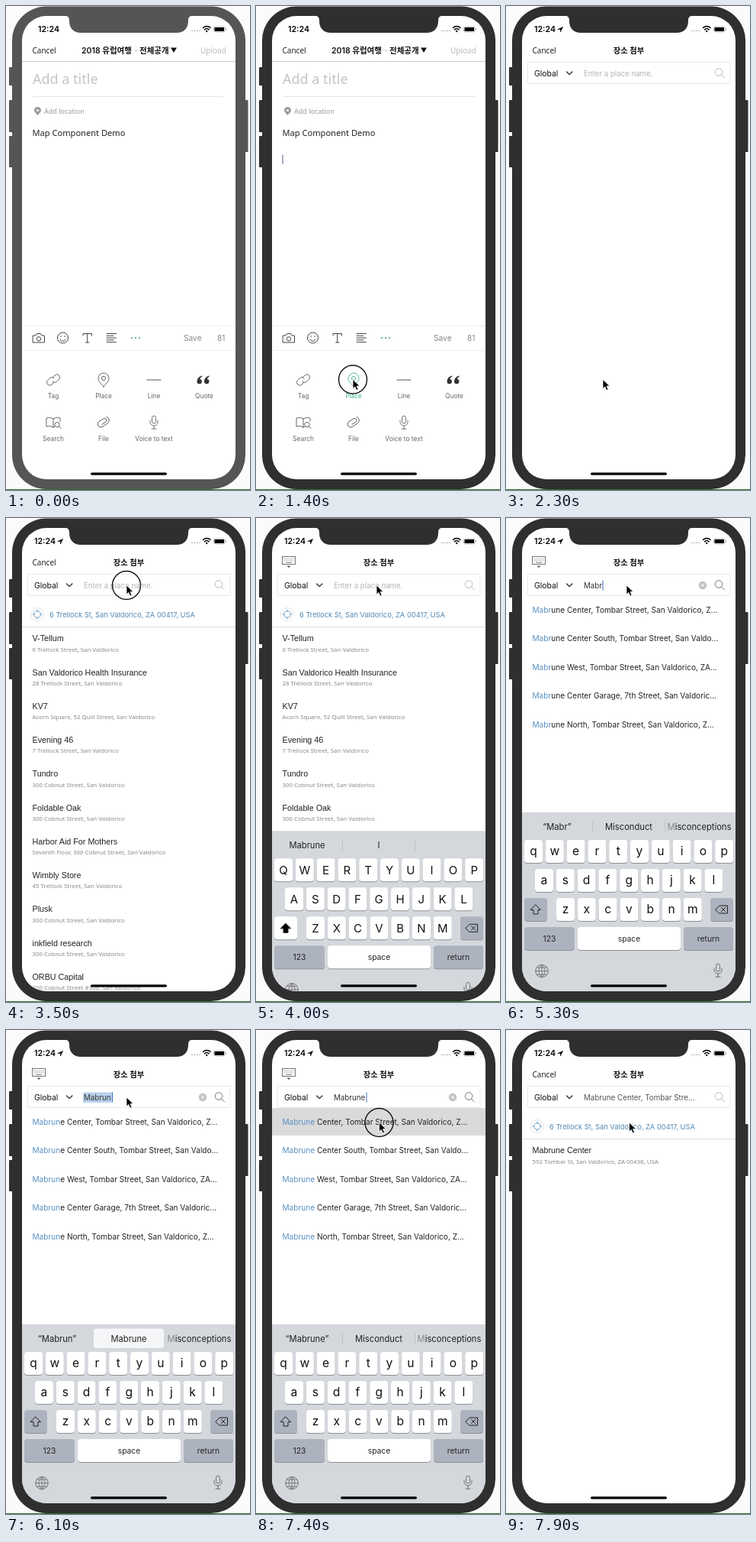
An HTML page that plays this animation: 320 px wide and 633 px high, repeating every 8000 ms.

```html
<!DOCTYPE html>
<html lang="ko">
<head>
<meta charset="utf-8">
<style>
html, body { margin: 0; width: 100%; height: 100%; overflow: hidden; background: #fbfbfb; }
svg { display: block; width: 100%; height: 100%; }
text { font-family: Inter, sans-serif; white-space: pre; }
.thin { font-family: "Noto Sans", sans-serif; font-weight: 300; }
.list { font-family: "Liberation Sans", sans-serif; }
.bold { font-family: Inter, "Noto Sans CJK KR", "Noto Sans CJK", sans-serif; font-weight: 600; }
.mid { text-anchor: middle; }
</style>
</head>
<body>
<svg id="stage" viewBox="0 0 320 633"></svg>
<script>
const LOOP = 8000, STEP = 100;
const WORD = 'Mabrune';
const CITY = 'San Valdorico';
const KEY_TIMES = [4700, 4900, 5100, 5300, 5500, 5700, 6300];
const PLACES = [
  ['V-Tellum', '6 Trellock Street'],
  [CITY + ' Health Insurance', '28 Trellock Street'],
  ['KV7', 'Acorn Square, 52 Quill Street'],
  ['Evening 46', '7 Trellock Street'],
  ['Tundro', '300 Cobnut Street'],
  ['Foldable Oak', '300 Cobnut Street'],
  ['Harbor Aid For Mothers', 'Seventh Floor, 300 Cobnut Street'],
  ['Wimbly Store', '45 Trellock Street'],
  ['Plusk', '300 Cobnut Street'],
  ['inkfield research', '300 Cobnut Street'],
  ['ORBU Capital', '300 Cobnut Street #300']
];
const RESULTS = [
  ` Center, Tombar Street, ${CITY}, Z...`,
  ' Center South, Tombar Street, San Valdo...',
  ` West, Tombar Street, ${CITY}, ZA...`,
  ' Center Garage, 7th Street, San Valdoric...',
  ` North, Tombar Street, ${CITY}, Z...`
];
const stage = document.getElementById('stage');

const ease = (t, a, b) => {
  const x = Math.min(1, Math.max(0, (t - a) / (b - a)));
  return x * x * (3 - 2 * x);
};
const text = (x, y, s, size, fill = '#222', cls = '') =>
  `<text x="${x}" y="${y}" font-size="${size}" fill="${fill}" class="${cls}">${s}</text>`;
const rect = (x, y, w, h, fill, r = 0) =>
  `<rect x="${x}" y="${y}" width="${w}" height="${h}" rx="${r}" fill="${fill}"/>`;
const line = (d, stroke = '#444', w = 1, fill = 'none') =>
  `<path d="${d}" stroke="${stroke}" stroke-width="${w}" fill="${fill}" stroke-linecap="round" stroke-linejoin="round"/>`;
const ring = (x, y, r, stroke = '#444', w = 1, fill = 'none') =>
  `<circle cx="${x}" cy="${y}" r="${r}" stroke="${stroke}" stroke-width="${w}" fill="${fill}"/>`;
const group = (x, y, s) => `<g transform="translate(${x} ${y})">${s}</g>`;
const rule = (y, color, a = 21, b = 301) => rect(a, y, b - a, 1, color);

const mic = line('M-2.5 -6.500a2.500 2.500 0 0 1 5 0v5a2.500 2.500 0 0 1 -5 0zM-5 -3v2a5 5 0 0 0 10 0v-2M0 4v4M-3 8h6', '#666', .9);
const pin = (c) => line('M0 9C-3 5 -7 2 -7 -2a7 7 0 0 1 14 0C7 2 3 5 0 9z', c, .9) + ring(0, -2, 2.6, c, .9);

function statusBar(located) {
  return text(located ? 37 : 42, 34, '12:24', 10.6, '#000', 'bold') +
    (located ? line('M68 30.500l6.500 -3l-3 6.500v-3.500z', '#000', .6, '#000') : '') +
    [244, 247.3, 250.6, 253.9].map(x => ring(x, 32.5, .8, 'none', 0, '#999')).join('') +
    line('M258.500 28.500a6.700 6.700 0 0 1 9.500 0M260.500 30.800a4 4 0 0 1 5.500 0', '#000', 1.6) +
    ring(263.2, 33, 1.2, 'none', 0, '#000') +
    `<rect x="272.500" y="27" width="14.500" height="7" rx="2" fill="none" stroke="#999" stroke-width=".7"/>` +
    rect(273.5, 28, 12.5, 5, '#000', 1) + rect(288, 29.5, 1, 2, '#999');
}

function editor(t) {
  const pressed = t >= 1300 && t < 1700;
  const gray = '#555', placeColor = pressed ? '#45b58a' : gray;
  const quote = x => `<path d="M${x + 6} -5.500c-4 1 -6.500 4 -6.500 7.500a3.200 3.200 0 1 0 4 -3c0 -1.500 1 -2.500 2.800 -3.500z" fill="#333"/>`;
  const clip = 'M-1.500 2.500l4 -4a2.600 2.600 0 0 0 -3.700 -3.700l-5 5a4 4 0 0 0 5.700 5.700l6 -6a5 5 0 0 0 -3 -8';
  const cells = [
    ['Tag', group(0, 0, line('M-1 -3l3 -3a3.800 3.800 0 0 1 5.400 5.400l-3 3a3.800 3.800 0 0 1 -5.400 0M1 3l-3 3a3.800 3.800 0 0 1 -5.400 -5.400l3 -3a3.800 3.800 0 0 1 5.400 0', gray, .9))],
    ['Place', pin(placeColor)],
    ['Line', line('M-9 0h18', gray)],
    ['Quote', quote(-9) + quote(.5)],
    ['Search', line('M0 6v-11c-3 -2 -6 -2 -9 -1v11c3 -1 6 -1 9 1M0 -5c3 -2 6 -2 9 -1v4M0 6l2 -1', gray, .9) + ring(5, 2.5, 3.2, gray, .9) + line('M7.500 5l2.500 2.500', gray, .9)],
    ['File', `<g transform="rotate(12)">${line(clip, gray, .9)}</g>`],
    ['Voice to text', mic]
  ];
  const grid = cells.map(([label, icon], i) => {
    const x = 62 + i % 4 * 66, y = 489 + Math.floor(i / 4) * 56;
    return group(x, y, icon) +
      text(x, y + 24, label, 8.4, i === 1 ? (pressed ? placeColor : '#666') : '#666', 'mid');
  }).join('');
  const caret = t >= 500 && t % 1000 < 500 || t >= 1000;
  return rect(21, 13, 280, 606, '#fff') +
    text(34.5, 62, 'Cancel', 10, '#222', 'thin') +
    text(99, 62, '2018 유럽여행', 10.5, '#111', 'bold') + text(169, 62, '·', 10.5, '#666') +
    text(175, 62, '전체공개', 10.5, '#111', 'bold') +
    '<path d="M216 54.500h8l-4 6.500z" fill="#111"/>' +
    text(255, 62, 'Upload', 10, '#bbb', 'thin') + rule(72, '#ccc') +
    text(35, 102, 'Add a title', 18, '#c4c4c4', 'thin') +
    rule(118, '#e6e6e6', 35, t < 1000 ? 285 : 288) +
    '<path d="M41.500 143c-2 -3 -4.500 -4 -4.500 -6.500a4.500 4.500 0 0 1 9 0c0 2.500 -2.500 3.500 -4.500 6.500z" fill="#999"/>' +
    ring(41.5, 136.5, 1.6, 'none', 0, '#fff') +
    text(50, 140.5, 'Add location', 9, '#999', 'thin') +
    text(34.5, 170, 'Map Component Demo', 11.1, '#222', 'thin') +
    (caret ? rect(34.5, 194.5, 1, 12, '#56508c') : '') +
    rule(418, '#eee') + rule(450, '#eee') +
    line('M35.500 431h3.500l1.500 -2.500h5l1.500 2.500h3.500v9h-15z') + ring(43, 435.3, 2.7) +
    ring(74.5, 434, 7) + line('M71 436a3.800 3.800 0 0 0 7 0') +
    ring(72, 432, .8, 'none', 0, '#444') + ring(77, 432, .8, 'none', 0, '#444') +
    line('M101 431v-2.500h11.500v2.500M106.700 428.500v11.500M104.500 440h4.500') +
    line('M132 428.500h12.500M132 431.300h9M132 434.100h12.500M132 436.900h9M132 439.700h12.500') +
    [165, 170, 175].map(x => ring(x, 434, 1, 'none', 0, '#3e9f8a')).join('') +
    text(233, 438, 'Save', 10.2, '#888') + text(277, 438, '81', 10, '#888') + grid;
}

function placeRows(places) {
  return places.map(([name, sub], i) =>
    text(34.5, 161.3 + i * 44.25, name, 10.75, '#222', 'list') +
    text(34.5, 174.7 + i * 44.25, sub, 7.9, '#888', 'thin')).join('');
}

function addressRow() {
  return ring(41, 126, 8.5, '#ddd', .8) + ring(41, 126, 4.5, '#6d9fc4', .9) +
    line('M41 120v3M41 129v3M35 126h3M44 126h3', '#6d9fc4', .8) +
    text(57, 129.5, `6 Trellock St, ${CITY}, ZA 00417, USA`, 9.3, '#5389b3') + rule(142, '#ddd');
}

function field(t, typed, done) {
  let s = '<rect x="28.500" y="73.500" width="265.500" height="28" fill="#fff" stroke="#e9e9e9"/>' +
    text(37, 92, 'Global', 10.4, '#111') + line('M79.500 86l3.700 3.700l3.700 -3.700', '#222', 1.2);
  const lens = typed && !done ? '#777' : '#bbb';
  s += ring(279, 86.5, 4.8, lens, 1) + line('M282.500 90l4 4', lens, 1);
  if (done) return s + text(102, 92, WORD + ' Center, Tombar Stre...', 9.8, '#555');
  if (!typed) return s + text(102, 92, 'Enter a place name.', 9.7, '#b5b5b5');
  const shown = WORD.slice(0, typed), marked = typed === 6;
  const width = [0, 9, 14.5, 20.5, 24, 30, 36.5, 42][typed];
  if (marked) s += rect(101, 81.5, width + 2, 13.5, '#b9d0ec');
  s += text(102, 92, shown, 9.8, '#333') + rect(102.5 + width, 81.5, 1, 13, '#3d6fc8');
  return s + ring(258, 88, 5.2, 'none', 0, '#c2c2c4') + line('M256 86l4 4M260 86l-4 4', '#fff', 1);
}

function finder(t, typed) {
  const done = t >= 7600, focused = t >= 3700 && !done;
  let s = rect(21, 13, 280, 606, '#fff');
  if (focused) {
    s += '<rect x="34.500" y="50.500" width="17" height="10" fill="none" stroke="#666" stroke-width=".9"/>' +
      line('M37 53.500h12M37 55.800h12', '#666', 1.1).replace('<path', '<path stroke-dasharray=".1 2.300"') +
      line('M39.500 58.300h7', '#666', .9) + '<path d="M40.500 62.500h5l-2.500 2.800z" fill="#666"/>';
  } else s += text(34.5, 62, 'Cancel', 10, '#222', 'thin');
  s += text(161, 61.5, '장소 첨부', 10.3, '#111', 'bold mid') + field(t, typed, done);
  if (done) {
    s += addressRow() + placeRows([[WORD + ' Center', '']]) +
      text(34.5, 174.7, `592 Tombar St, ${CITY}, ZA 00438, USA`, 7.9, '#888', 'thin');
  } else if (!typed) {
    if (t >= 2500) s += addressRow() + placeRows(PLACES.map(([n, a]) => [n, `${a}, ${CITY}`]));
  } else if (typed > 3) {
    if (t >= 7300) s += rect(21, 102, 280, 36, '#dadada');
    s += RESULTS.map((rest, i) => text(34.5, 123.6 + i * 37.5,
      `<tspan fill="#5790c2">${WORD.slice(0, typed)}</tspan>${WORD.slice(typed)}${rest}`, 10.1)).join('');
  }
  return s;
}

function keyboard(typed) {
  const upper = !typed, dark = '#adb3be';
  const key = (x, y, w, fill = '#fff') => rect(x, y + 1, w, 30, '#8d9096', 4) + rect(x, y, w, 30, fill, 4);
  let s = rect(21, 385, 280, 234, '#d4d7dc');
  const hints = upper ? [WORD, 'I', ''] :
    [`“${WORD.slice(0, typed)}”`, typed === 6 ? WORD : 'Misconduct', '<tspan fill="#888">M</tspan>isconceptions'];
  if (typed === 6) s += rect(115, 390.5, 92, 25.5, '#f5f6f8', 4);
  else s += rect(113, 396, 1, 15, '#bfc2c8') + rect(208, 396, 1, 15, '#bfc2c8');
  s += hints.map((h, i) => text([67, 161, 253.5][i], 408, h, 11.2, '#222', 'mid')).join('');
  ['QWERTYUIOP', 'ASDFGHJKL', 'ZXCVBNM'].forEach((row, r) => {
    [...row].forEach((c, i) => {
      const x = [36, 50, 78][r] + i * 27.8, y = 421 + r * 38;
      s += key(x - 12, y, 24) +
        text(x, y + (upper ? 20.7 : 19.8), upper ? c : c.toLowerCase(), upper ? 15 : 15.6, '#111', 'mid');
    });
  });
  s += key(24, 497, 30, upper ? '#fff' : dark) +
    line('M39 506l6.500 6.500h-3.500v5.500h-6v-5.500h-3.500z', '#222', 1, upper ? '#000' : 'none') +
    key(268, 497, 30, dark) + line('M275 512l5 -5h10.500v10h-10.500zM282.500 509.500l5 5M287.500 509.500l-5 5', '#222', 1) +
    key(24, 535, 66, dark) + key(94, 535, 135) + key(233, 535, 65, dark);
  s += text(57, 553.5, '123', 10.3, '#222', 'mid') + text(161.5, 553.5, 'space', 10.3, '#222', 'mid') +
    text(265.5, 553.5, 'return', 10.3, '#222', 'mid');
  return s + group(47, 592.5, ring(0, 0, 8.2, '#666', .9) +
    line('M0 -8v16M-8 0h16M-6.500 -4.500h13M-6.500 4.500h13M0 -8c-5.500 5 -5.500 11 0 16c5.500 -5 5.500 -11 0 -16', '#666', .8)) +
    group(278, 592, mic);
}

function pointer(t) {
  if (t < 600) return '';
  const path = [[600, 205, 410], [1200, 127, 488.5], [2500, 127, 488.5], [3200, 158, 88], [6400, 158, 88], [7000, 161.5, 121], [LOOP, 161.5, 121]];
  const i = path.findIndex(p => t < p[0]);
  const [a, ax, ay] = path[i - 1], [b, bx, by] = path[i], k = ease(t, a, b);
  const x = ax + (bx - ax) * k, y = ay + (by - ay) * k;
  const tapping = [[1300, 1600], [3500, 3700], [7300, 7600]].some(([from, to]) => t >= from && t < to);
  return (tapping ? ring(x, y, 18.5, '#111', 1.4) : '') +
    group(x, y, '<path d="M0 0v12l2.800 -2.600l2 4.600l2.200 -.9l-2 -4.500h4z" fill="#000" stroke="#fff" stroke-width=".8"/>');
}

function scene(t) {
  const typed = KEY_TIMES.filter(k => t >= k).length;
  const body = t < 1000 ? '#555' : '#2f2f30';
  const modalY = 606 * (1 - ease(t, 1500, 2100));
  const keysY = 234 * (1 - ease(t, 3600, 4100) + ease(t, 7500, 7900));
  return '<clipPath id="screen"><rect x="21" y="13" width="280" height="606" rx="32"/></clipPath>' +
    rect(0, 632, 320, 1, '#22742a') +
    [[80, 24], [123, 42], [170, 41]].map(([y, h]) => rect(4, y, 5, h, body, 1)).join('') +
    rect(313, 123, 4.5, 68, body, 1) + rect(8, .5, 306, 631.5, body, 45) +
    '<g clip-path="url(#screen)">' +
    (t < 2100 ? editor(t) : '') +
    (t >= 1600 ? group(0, modalY, finder(t, typed)) : '') +
    (keysY < 234 ? group(0, keysY, keyboard(typed)) : '') +
    '</g>' +
    `<path d="M76 12.500c5 0 7 2 7 7c0 10 6 15.500 15 15.500h126c9 0 15 -5.500 15 -15.500c0 -5 2 -7 7 -7z" fill="${body}"/>` +
    statusBar(t >= 2100) + rect(111, 610.2, 100, 3.2, '#000', 1.6) + pointer(t);
}

let last = -1;
function draw(now) {
  const t = Math.floor(now % LOOP / STEP) * STEP;
  if (t !== last) stage.innerHTML = scene(last = t);
  requestAnimationFrame(draw);
}
draw(performance.now());
</script>
</body>
</html>
```
